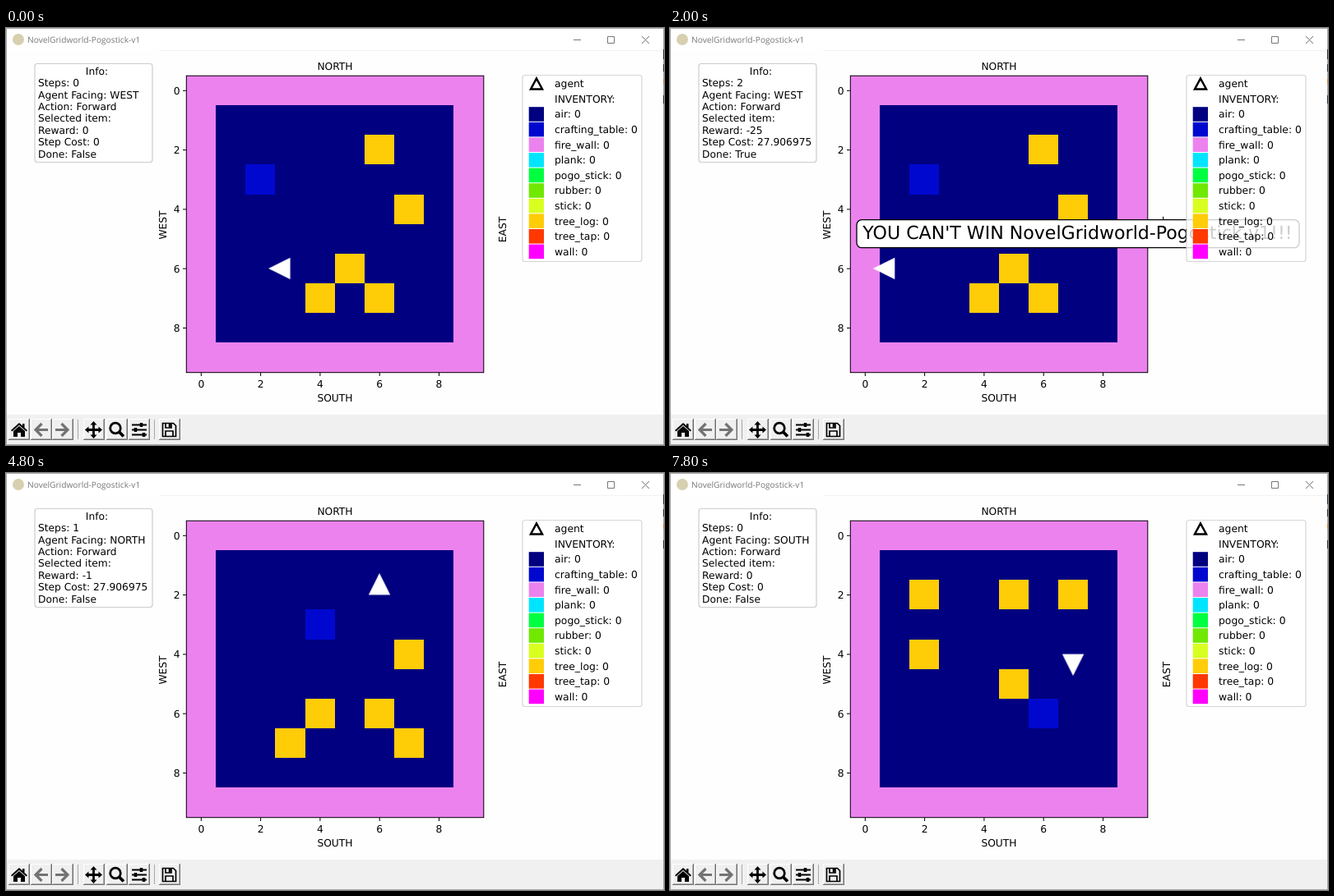
Recreate the animation shown at these times as an HTML page. Size 800x508 px, loop 8 s.

```html
<!DOCTYPE html>
<html lang="en">
<head>
<meta charset="utf-8">
<title>NovelGridworld-Pogostick-v1</title>
<style>
html, body { margin: 0; width: 100%; height: 100%; overflow: hidden; background: #fefefe; }
svg { display: block; width: 800px; height: 508px; }
text { font: 12.25px "DejaVu Sans", sans-serif; text-rendering: geometricPrecision; white-space: pre; }
.title { font: 10.2px "Open Sans", "Noto Sans", sans-serif; fill: #777; }
.banner text { font-size: 22.1px; }
.legend text { font-size: 12.35px; }
.mid { text-anchor: middle; }
.end { text-anchor: end; }
.crisp { shape-rendering: crispEdges; }
.air { fill: #000080; }
.table { fill: #0008d0; }
.fire { fill: #ec82ee; }
.log { fill: #ffcc08; }
.line { fill: none; stroke: #000; }
.gray { color: #737373; }

.world1, .world2, .world3, .step0, .step1, .step2, .agent {
  animation: 8s step-end infinite;
}
.world1 { animation-name: world1; }
.world2 { animation-name: world2; }
.world3 { animation-name: world3; }
.step0 { animation-name: step0; }
.step1 { animation-name: step1; }
.step2 { animation-name: step2; }
.agent { fill: #fff; animation-name: agent; }

@keyframes world1 { 0% { visibility: visible } 47.5%, 100% { visibility: hidden } }
@keyframes world2 { 0%, 88.75%, 100% { visibility: hidden } 47.5% { visibility: visible } }
@keyframes world3 { 0% { visibility: hidden } 88.75%, 100% { visibility: visible } }
@keyframes step0 {
  0%, 47.5%, 88.75%, 100% { visibility: visible }
  15%, 56.25% { visibility: hidden }
}
@keyframes step1 {
  0%, 25%, 66.25%, 100% { visibility: hidden }
  15%, 56.25% { visibility: visible }
}
@keyframes step2 {
  0%, 47.5%, 88.75%, 100% { visibility: hidden }
  25%, 66.25% { visibility: visible }
}
/* cell units, pointing up by default */
@keyframes agent {
  0% { transform: translate(3.5px, 6.5px) rotate(-90deg) }
  15% { transform: translate(2.5px, 6.5px) rotate(-90deg) }
  25% { transform: translate(1.5px, 6.5px) rotate(-90deg) }
  47.5% { transform: translate(6.5px, 3.5px) rotate(0deg) }
  56.25% { transform: translate(6.5px, 2.5px) rotate(0deg) }
  66.25% { transform: translate(6.5px, 1.5px) rotate(0deg) }
  88.75%, 100% { transform: translate(7.5px, 4.5px) rotate(180deg) }
}
</style>
</head>
<body>
<svg viewBox="0 0 800 508">
  <rect width="800" height="508" fill="#fefefe"/>

  <!-- title bar -->
  <rect width="800" height="28" fill="#fff"/>
  <path d="M186 27.5H798" stroke="#f1f1f1"/>
  <circle cx="15" cy="14" r="7" fill="#d6d0b0"/>
  <text class="title" x="26" y="18">NovelGridworld-Pogostick-v1</text>
  <path d="M690 14.5h9M731.5 10.5h8v8h-8zM773 10l9 9m0-9l-9 9" fill="none" stroke="#777"/>

  <!-- toolbar -->
  <rect y="471" width="800" height="36" fill="#f0f0f0"/>
  <g id="buttons" class="crisp"></g>
  <path class="crisp" d="M87.5 477v24M180.5 477v24" stroke="#a8a8a8"/>
  <path d="M6 490l10-9 4 3.600v-2.600h2.500v5l3.500 3-1.300 1.500-8.700-7.800-8.700 7.800zM9 491l7-6 7 6v7h-5v-5h-4v5H9z"/>
  <g fill="none" stroke="currentColor" stroke-width="3.200" class="gray">
    <path d="M43.500 482l-7.500 7.500 7.500 7.500M36.500 489.500H51"/>
    <path d="M67.500 482l7.500 7.500-7.500 7.500M74.500 489.500H60"/>
  </g>
  <path d="M106.500 479l4 4.500h-2.600v4.600h4.600v-2.600l4.500 4-4.500 4v-2.600h-4.600v4.600h2.600l-4 4.500-4-4.500h2.600v-4.600h-4.600v2.600l-4.500-4 4.500-4v2.600h4.600v-4.600h-2.600z"/>
  <g class="line">
    <circle cx="133" cy="487.500" r="6.300" stroke-width="2.800"/>
    <path d="M137.500 492l5.500 5.500" stroke-width="3.800"/>
    <path d="M153 483.500h18M153 489.500h18M153 495.500h18" stroke-width="1.800"/>
    <path d="M164.500 481v5M157.500 487v5M167.500 493v5" stroke-width="3.500"/>
    <path d="M190.500 481.500h13l3 3v13h-16zM194 497v-6h9v6M194 482v5h7v-5" stroke-width="1.700"/>
    <path d="M199 482v4.500" stroke-width="2.500"/>
  </g>

  <!-- window edge -->
  <path class="crisp" d="M0 .5H800M.5 0V508M799.500 0V508M0 507.500H800" stroke="#a9a9a9"/>
  <path class="crisp" d="M799.500 26v12M799.500 44v9M799.500 82v10" stroke="#25343c"/>
  <path class="crisp" d="M799.500 62v6" stroke="#e08030"/>

  <!-- information box -->
  <rect x="35" y="43.500" width="143" height="120" rx="3" fill="#fff" stroke="#ccc" stroke-width="1.200"/>
  <g id="info"></g>

  <!-- world, one unit per cell -->
  <g transform="translate(219 58) scale(36.15)">
    <g class="crisp">
      <rect class="fire" width="10" height="10"/>
      <rect class="air" x="1" y="1" width="8" height="8"/>
      <g id="worlds"></g>
    </g>
    <path class="agent" d="M0-.73L.365 0h-.73z"/>
  </g>
  <rect class="line" x="219.300" y="58.200" width="361.500" height="361.500"/>
  <g id="ticks"></g>
  <text class="mid" x="400" y="50.500">NORTH</text>
  <text class="mid" x="400" y="455.400">SOUTH</text>
  <text class="mid" transform="translate(195 240) rotate(-90)">WEST</text>
  <text class="mid" transform="translate(608.400 245.500) rotate(-90)">EAST</text>

  <g class="banner step2">
    <rect x="227" y="233.700" width="538" height="34" rx="6" fill="#fff" stroke="#000" stroke-width="1.300"/>
    <text x="234.300" y="256.500">YOU CAN'T WIN NovelGridworld-Pogostick-v1!!!</text>
  </g>

  <g class="legend">
    <rect x="628" y="57.500" width="145" height="227" rx="3" fill="#fff" fill-opacity=".8" stroke="#ccc" stroke-opacity=".8" stroke-width="1.200"/>
    <path d="M645 61.500l7 13h-14z" fill="#fff" stroke="#000" stroke-width="2.500"/>
    <text x="667" y="72.400">agent</text>
    <text x="667" y="91">INVENTORY:</text>
    <g id="legend"></g>
  </g>
</svg>
<script>
const fill = (id, parts) => document.getElementById(id).innerHTML = parts.join("");
const label = (x, y, str, cls = "") => `<text class="${cls}" x="${x}" y="${y}">${str}</text>`;
const row = (n, str) => label(39, 71.4 + n * 14.36, str);
const cells = (cls, list) =>
  `<path class="${cls}" d="${list.map(([x, y]) => `M${x} ${y}h1v1h-1z`).join("")}"/>`;

fill("buttons", [3, 30, 56, 94, 122, 149, 186].map(x => `
  <rect x="${x}" y="476" width="25" height="26" fill="#f0f0f0"/>
  <path d="M${x + .5} 501V476.500H${x + 24}" fill="none" stroke="#fff"/>
  <path d="M${x} 501.500H${x + 25.5}V476" fill="none" stroke="#707070"/>
  <path d="M${x + 1} 500.500H${x + 24.5}V477" fill="none" stroke="#b0b0b0"/>`));

const steps = [[0, 0, 0, "False"], [1, -1, 27.906975, "False"], [2, -25, 27.906975, "True"]];
fill("info", [
  label(110.5, 57, "Info:", "mid"),
  row(2, "Action: Forward"),
  row(3, "Selected item:"),
  ...["WEST", "NORTH", "SOUTH"].map((side, i) =>
    `<g class="world${i + 1}">${row(1, "Agent Facing: " + side)}</g>`),
  ...steps.map(([n, reward, cost, done], i) => `<g class="step${i}">
    ${row(0, "Steps: " + n)}${row(4, "Reward: " + reward)}
    ${row(5, "Step Cost: " + cost)}${row(6, "Done: " + done)}</g>`)
]);

const worlds = [
  { table: [2, 3], logs: [[6, 2], [7, 4], [5, 6], [4, 7], [6, 7]] },
  { table: [4, 3], logs: [[7, 4], [4, 6], [6, 6], [3, 7], [7, 7]] },
  { table: [6, 6], logs: [[2, 2], [5, 2], [7, 2], [2, 4], [5, 5]] }
];
fill("worlds", worlds.map((w, i) =>
  `<g class="world${i + 1}">${cells("table", [w.table])}${cells("log", w.logs)}</g>`));

fill("ticks", [0, 2, 4, 6, 8].map(n => {
  const x = 237.3 + n * 36.15, y = 76.3 + n * 36.15;
  return `<path class="line" d="M${x} 420v4M219 ${y}h-4"/>` +
    label(x, 437.6, n, "mid") + label(211.5, y + 4.5, n, "end");
}));

const items = {
  air: "#000080", crafting_table: "#0008d0", fire_wall: "#ec82ee", plank: "#00e5ff",
  pogo_stick: "#00ff40", rubber: "#70e800", stick: "#d8ff20", tree_log: "#ffcc08",
  tree_tap: "#ff3800", wall: "#ff00ff"
};
fill("legend", Object.entries(items).map(([name, color], i) => {
  const y = 105 + i * 18.6;
  return `<rect x="635.700" y="${y - 8.8}" width="18.300" height="17.600" fill="${color}"/>` +
    label(667, y + 4.4, name + ": 0");
}));
</script>
</body>
</html>
```
